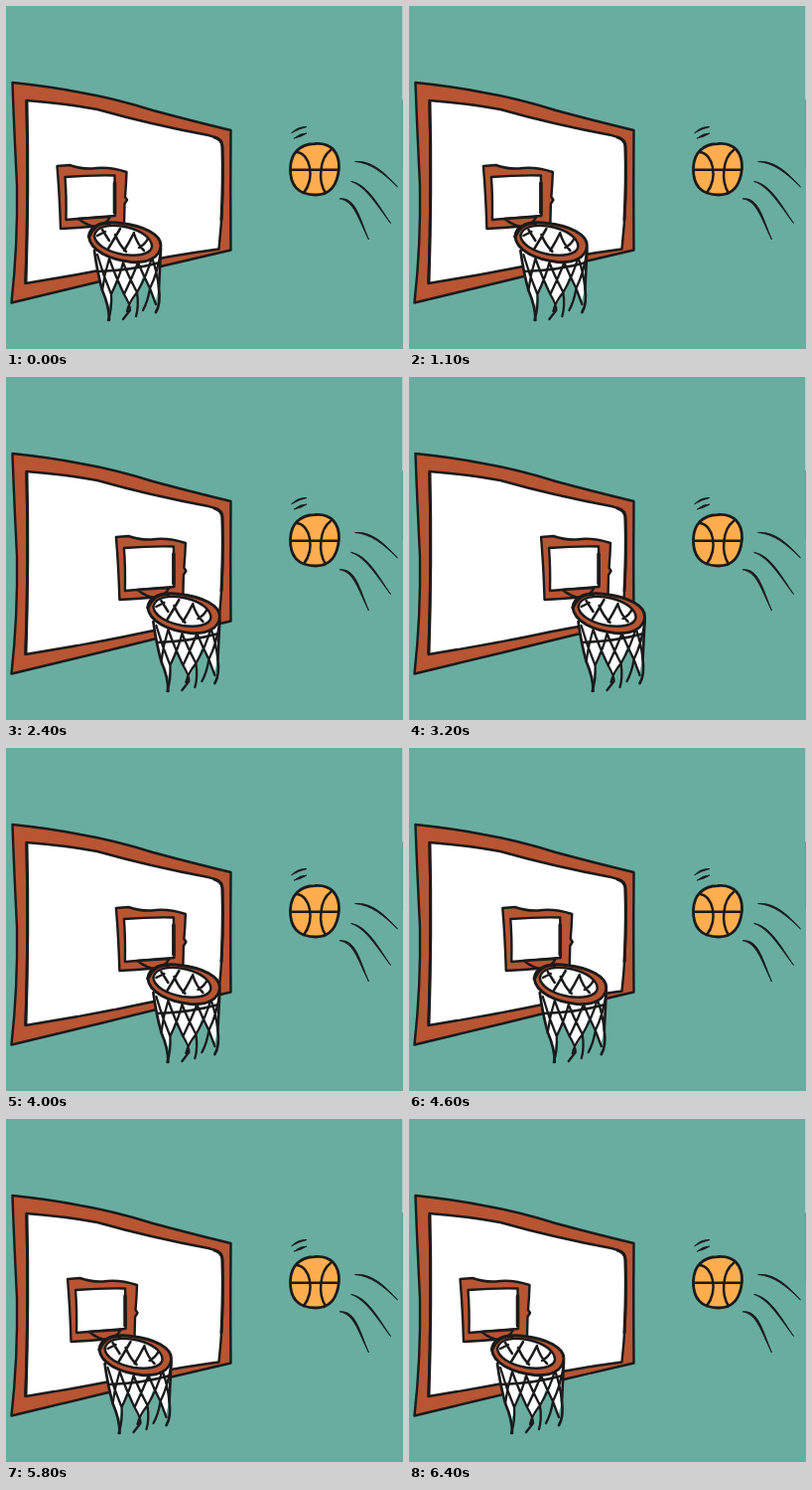
Write an HTML page that moves like this. It is 400 px wide and 345 px high and loops after 6.5 s.

```html
<!DOCTYPE html>
<html lang="en">
<head>
<meta charset="utf-8">
<title>Moving hoop</title>
<style>
  html, body { margin: 0; width: 100%; height: 100%; overflow: hidden; background: #68ada0; }
  svg { display: block; width: 100%; height: 100%; }
  .rust { fill: #b85533; }
  .white { fill: #fff; }
  .line { fill: none; }
  .taper { fill: #1b1a1b; stroke-width: .9; }
</style>
</head>
<body>
<svg viewBox="0 0 400 345" stroke="#1b1a1b" stroke-width="2.4" stroke-linecap="round" stroke-linejoin="round">
  <path d="M399.5 0V94" stroke="#a9cdc6" stroke-width="1" stroke-linecap="butt"/>
  <path d="M399.5 95V163" stroke="#5f9f93" stroke-width="1" stroke-linecap="butt"/>

  <!-- Backboard -->
  <path class="rust" d="M6.500 77Q45 81 75 87Q110 93 148 105Q185 115 226.500 125Q226 185 226.500 245.500L160 261L95 277L5.500 298.500Q12 240 11 180Q8 120 6.500 77Z"/>
  <path class="white" d="M20.500 95Q60 98 92 104Q145 119 204 130Q217 133 218 140Q220 195 214.500 244.500Q165 251 120 261Q70 271 19.500 279Q23 185 20.500 95Z"/>
  <path class="line" d="M21 97Q23 185 20 278M210 132Q218 134 218 142Q219 175 217 215" stroke-width="3"/>

  <!-- Ball -->
  <path d="M311 138.500C328 137 336 148 335.500 163C334 180 327 190 312 190C294 190 286 180 286.500 163C287 148 296 139 311 138.500Z" fill="#ffad4f" stroke-width="2.800"/>
  <path class="line" d="M287 164.700H335M293 147C306 148 312 172 300 188M327 145C316 153 314 176 322 188" stroke-width="2.500"/>

  <!-- Flight marks -->
  <path class="taper" d="M288 127.500Q294 121 303 121.500Q295 123.500 288 127.500ZM290.500 133Q296 128 303 128Q297 132 290.500 133ZM352 156.500C368 155 381 167 394.500 182C380 168 368 158 352 156.500ZM348 176.500C364 179 375 200 387.500 218.500C374 201 363 182 348 176.500ZM336.500 193.800C352 192 356 212 365.500 235C354 212 351 197 336.500 193.800Z"/>

  <g id="hoop">
    <!-- Target square and bracket -->
    <path class="rust" d="M51.500 161L64 160Q75 164 87 163.500Q103 161 121.500 167Q121 181 120 192L122 195L119.500 199L119 219Q90 222 55 224Q54 190 51.500 161Z"/>
    <path class="white" d="M59.500 172Q85 170 109.500 170.500L110 211Q85 213 60.500 215Q61 190 59.500 172Z"/>
    <path class="line" d="M109.500 178V208" stroke-width="3.600"/>
    <path class="rust" d="M73 214Q83 222 92 222Q101 220 105 212Z"/>

    <!-- Net below the rim -->
    <path class="white" stroke="none" d="M89 246L97 286L103 306L106 290L112 272L119 290L124 304L132 288L139 269L145 284L150 299L154 284L156 242Z"/>
    <path class="line" d="M89 246Q92 268 97 286Q104 302 104 316M156 243Q155 265 154 284Q156 300 151 308M93 267Q126 266 155 258" stroke-width="2.700"/>
    <path class="line" d="M104 254Q99 270 97 286M92 250Q98 271 106 290Q107 304 103 316M118 258Q115 271 106 290M104 254Q110 271 119 290Q125 300 125 306L118 315M133 258Q128 271 119 290M118 258Q123 271 132 288Q134 302 131 312M147 253Q142 271 132 288Q124 298 122 307M133 258Q138 270 145 284L151 300M156 246Q153 268 145 284Q143 297 138 306M147 253Q152 266 154 284" stroke-width="2.300"/>

    <!-- Rim -->
    <path class="rust" stroke-width="2.800" d="M83.500 232C84 220 99 216 116 218.500C139 221 156 230 156 241C155 253 143 259 126 257.500C104 255 85 246 83.500 232Z"/>
    <path class="white" d="M89 231C91 221 106 219 122 222.500C137 226 147 234 147 242C146 250 132 252 118 250C102 247 90 240 89 231Z"/>
    <path class="line" stroke-width="2.500" d="M92 231L100 227M97 225L104 236M103 244Q108 236 115 224M110 230Q114 240 121 247M119 246Q124 238 129 228M129 229Q132 239 139 246M134 243Q140 240 143 234"/>
    <path class="line" d="M83.500 232Q90 217 104 218.500" stroke-width="3.400"/>
  </g>
</svg>
<script>
const DURATION = 6500, STEP = 100, TURN = 3200;
const hoop = document.getElementById('hoop');

// Slow departure, then steady travel; the return mirrors the outward trip.
function offsetAt(time) {
  const travel = TURN - Math.abs(TURN - time);
  return travel < 700 ? travel * 12.3 / 700 : 12.3 + (travel - 700) * 0.0277;
}

function draw(now) {
  const time = Math.floor(now % DURATION / STEP) * STEP;
  hoop.setAttribute('transform', `translate(${offsetAt(time).toFixed(2)} 0)`);
  requestAnimationFrame(draw);
}
draw(performance.now());
</script>
</body>
</html>
```
